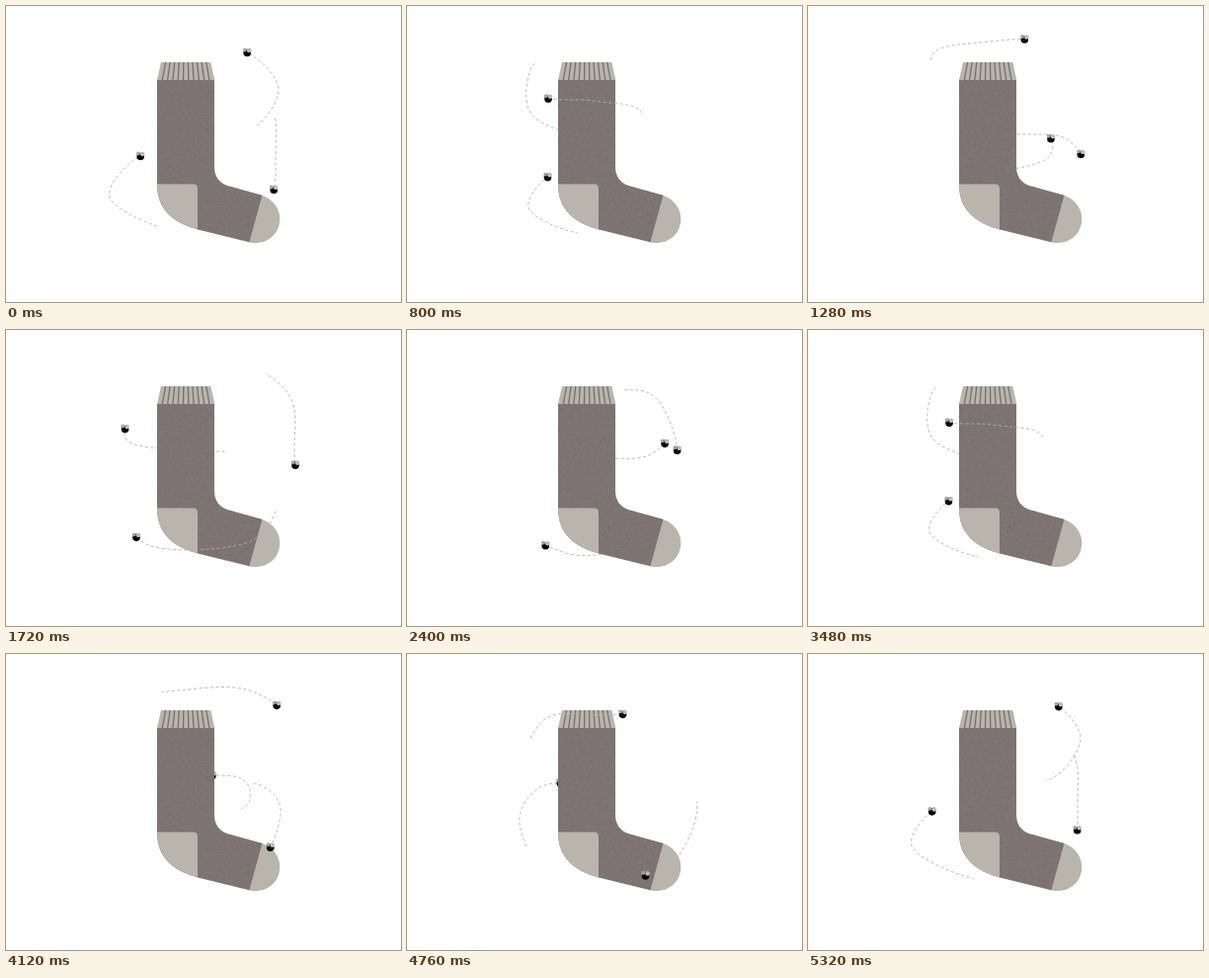
Animation of 400x300 px, one loop 5.36 s. Source, as an HTML page with a canvas:

```html
<!DOCTYPE html>
<html lang="en">
<head>
<meta charset="utf-8">
<title>Sock with flies</title>
<style>
html, body { margin: 0; width: 100%; height: 100%; overflow: hidden; background: #fff; }
canvas { display: block; width: 400px; height: 300px; }
</style>
</head>
<body>
<canvas id="stage"></canvas>
<script>
const W = 400, H = 300, LOOP = 2680, STEP = 40;
const LIGHT = '#b9b5ad', DARK = '#7d7473';

const ratio = window.devicePixelRatio || 1;
function setup(canvas) {
  canvas.width = W * ratio;
  canvas.height = H * ratio;
  const c = canvas.getContext('2d');
  c.scale(ratio, ratio);
  return c;
}
const ctx = setup(document.getElementById('stage'));

// Each route is a closed loop of waypoints passed at equal time steps.
// Positions along it, and the stretches in front of the sock, count waypoints.
const COUNT = 16;   // waypoints per loop
const TAIL = 1.9;   // trail length
const GRID = 32;    // curve samples per waypoint

const flies = [
  {
    route: '244,47 203,48 162,47 127,61 125,108 172,131 218,130 260,134 ' +
           '278,163 248,214 147,219 114,172 135,135 189,130 247,126 276,84',
    front: [[8, 11]]
  },
  {
    route: '271,186 256,214 217,228 168,229 123,204 152,167 208,165 245,152 ' +
           '238,126 184,122 122,111 141,65 195,62 247,65 271,107 273,151',
    front: [[0, 4], [11, 13]]
  },
  {
    route: '136,152 185,152 231,144 236,106 187,96 134,90 127,48 174,37 ' +
           '243,36 288,68 292,123 291,172 262,218 209,226 161,226 105,194',
    front: [[2.3, 5.5]],
    bodyFront: [11, 14]
  }
];

const wrap = (v, n) => ((v % n) + n) % n;

// Catmull-Rom curve through the waypoints.
function position(fly, u) {
  const i = Math.floor(u), f = u - i;
  const [a, b, c, d] = [-1, 0, 1, 2].map(k => fly.points[wrap(i + k, COUNT)]);
  return [0, 1].map(k => b[k] + 0.5 * f * (c[k] - a[k] +
    f * (2 * a[k] - 5 * b[k] + 4 * c[k] - d[k] +
    f * (3 * (b[k] - c[k]) + d[k] - a[k]))));
}

for (const fly of flies) {
  fly.points = fly.route.split(' ').map(p => p.split(',').map(Number));
  fly.length = [0];
  for (let i = 0; i < COUNT * GRID; i++) {
    const [x0, y0] = position(fly, i / GRID), [x1, y1] = position(fly, (i + 1) / GRID);
    fly.length.push(fly.length[i] + Math.hypot(x1 - x0, y1 - y0));
  }
  const total = fly.length[COUNT * GRID];
  fly.dash = total / Math.round(total / 5.6);
}

function shape(draw) {
  const p = new Path2D();
  draw(p);
  p.closePath();
  return p;
}
function sole(p) {
  p.lineTo(194, 226.4);
  p.bezierCurveTo(170, 220, 153, 207, 153, 180.5);
}
const body = shape(p => {
  p.moveTo(153, 74);
  p.lineTo(211, 74);
  p.lineTo(211, 163);
  p.bezierCurveTo(211, 173, 216, 179, 224, 182);
  p.lineTo(260, 192);
  p.lineTo(247, 239.5);
  sole(p);
});
const heel = shape(p => {
  p.moveTo(153, 180.5);
  p.lineTo(189.5, 180.5);
  p.quadraticCurveTo(194, 180.5, 194, 185);
  sole(p);
});
const toe = shape(p => {
  p.moveTo(259.4, 192);
  p.bezierCurveTo(271, 196, 277.3, 206, 277.3, 216);
  p.bezierCurveTo(277.3, 231, 264, 243, 246.4, 239.4);
});
const cuff = shape(p => {
  p.moveTo(157, 57);
  p.lineTo(207.3, 57);
  p.lineTo(211.3, 75);
  p.lineTo(153, 75);
});
const outline = new Path2D();
[body, toe, cuff].forEach(p => outline.addPath(p));

function paintSock() {
  const canvas = document.createElement('canvas');
  const c = setup(canvas);
  const fill = (path, color) => { c.fillStyle = color; c.fill(path); };
  let seed = 17;
  const random = () => (seed = seed * 16807 % 2147483647) / 2147483647;

  fill(body, DARK);
  c.save();
  c.clip(body);
  for (let i = 0; i < 1900; i++) {
    c.fillStyle = random() < 0.7 ? '#6c6363' : '#8a8180';
    c.fillRect(152 + random() * 110, 74 + random() * 168, 0.8, 0.7);
  }
  c.restore();
  fill(heel, LIGHT);
  fill(toe, LIGHT);
  fill(cuff, LIGHT);

  c.strokeStyle = '#776f6d';
  c.lineWidth = 1.3;
  for (let i = 1; i <= 10; i++) {
    const u = i / 11;
    c.beginPath();
    c.moveTo(157 + 50.3 * u, 57);
    c.lineTo(153 + 58.3 * u, 75);
    c.stroke();
  }
  return canvas;
}
const sock = paintSock();

function drawTrail(fly, from, to) {
  const first = Math.ceil(from * GRID), last = Math.floor(to * GRID);
  if (last <= first) return;
  ctx.strokeStyle = '#b0b0b0';
  ctx.lineWidth = 0.9;
  ctx.setLineDash([fly.dash * 0.56, fly.dash * 0.44]);
  ctx.lineDashOffset = fly.length[wrap(first, COUNT * GRID)];
  ctx.beginPath();
  for (let i = first; i <= last; i++) ctx.lineTo(...position(fly, i / GRID));
  ctx.stroke();
  ctx.setLineDash([]);
}

function disc(x, y, r, color) {
  ctx.fillStyle = color;
  ctx.beginPath();
  ctx.arc(x, y, r, 0, 2 * Math.PI);
  ctx.fill();
}

function drawFly(fly, u) {
  const [x, y] = position(fly, u);
  disc(x + 0.2, y + 0.5, 3.8, '#050505');
  disc(x - 2.1, y - 2.5, 1.9, '#a5a5a5');
  disc(x + 2.2, y - 2, 2.3, '#bcbcbc');
}

function render(t) {
  const u = t / LOOP * COUNT, tail = u - TAIL;
  ctx.fillStyle = '#fff';
  ctx.fillRect(0, 0, W, H);
  for (const fly of flies) drawTrail(fly, tail, u);
  for (const fly of flies) drawFly(fly, u);
  ctx.drawImage(sock, 0, 0, W, H);

  ctx.save();
  ctx.clip(outline);
  for (const fly of flies) {
    for (const [a, b] of fly.front) drawTrail(fly, Math.max(a, tail), Math.min(b, u));
  }
  for (const fly of flies) {
    const spans = fly.bodyFront ? [...fly.front, fly.bodyFront] : fly.front;
    if (spans.some(([a, b]) => u >= a && u <= b)) drawFly(fly, u);
  }
  ctx.restore();
}

const begin = performance.now();
function tick() {
  const t = wrap(performance.now() - begin, LOOP);
  render(Math.floor(t / STEP) * STEP);
  requestAnimationFrame(tick);
}
tick();
</script>
</body>
</html>
```
